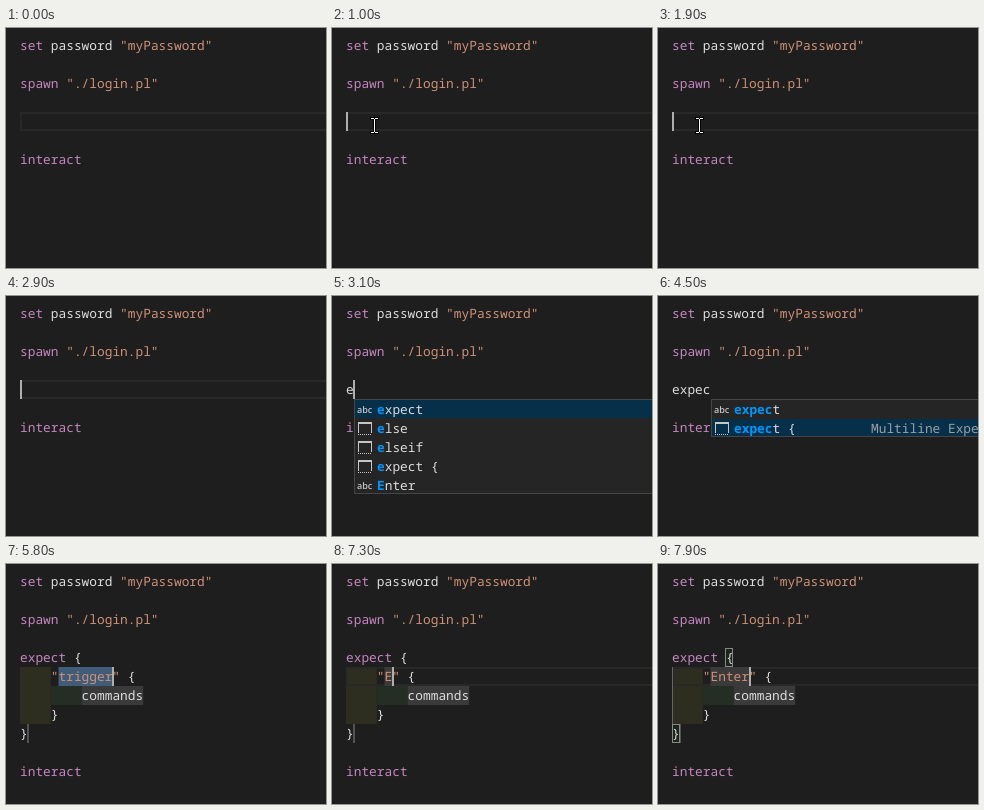
An HTML page with a canvas for the animation above (8000 ms loop, 320 by 240 pixels).

```html
<!DOCTYPE html>
<html lang="en">
<head>
<meta charset="utf-8">
<title>Editor snippet</title>
<style>
html, body { margin: 0; width: 100%; height: 100%; overflow: hidden; background: #1e1e1e; }
canvas { display: block; }
</style>
</head>
<body>
<canvas id="stage" width="320" height="240"></canvas>
<script>
const ctx = document.getElementById('stage').getContext('2d');
const LOOP = 8000, LEFT = 14, TOP = 8, CHAR = 7.7, LINE = 19;
const MONO = '"Noto Sans Mono", "DejaVu Sans Mono", monospace';
const KEYWORD = '#c586c0', STRING = '#ce9178', PLAIN = '#dcdcdc', MATCH = '#0097fb';

const colX = col => LEFT + col * CHAR;
const rowY = row => TOP + row * LINE;

// Latest entry of a [time, ...values] list that has started.
const at = (list, t) => list.filter(entry => entry[0] <= t).pop();

function rect(x, y, w, h, color) {
  ctx.fillStyle = color;
  ctx.fillRect(x, y, w, h);
}

function text(str, x, y, color, font = '12.833px ' + MONO) {
  ctx.font = font;
  ctx.fillStyle = color;
  ctx.fillText(str, x, y);
}

// Writes [string, color] pieces one after the other.
function code(row, col, ...pieces) {
  for (const [str, color] of pieces) {
    text(str, colX(col), rowY(row) + 14, color);
    col += str.length;
  }
}

function frame(x, y, w, h, color, weight = 1) {
  ctx.strokeStyle = color;
  ctx.lineWidth = weight;
  ctx.strokeRect(x + weight / 2, y + weight / 2, w - weight, h - weight);
}

const lineHighlight = row => frame(LEFT, rowY(row), 340, LINE, '#282828', 2);

function caret(row, col) {
  rect(Math.floor(colX(col)), rowY(row), 2, LINE, '#aeafad');
}

// The blink restarts with every key press.
const blinkOn = (t, start) => Math.floor((t - start) / 500) % 2 === 0;

const pointerPath = [
  [0], [300, 55, 47], [400, 52, 62], [500, 47, 84], [600, 43, 94], [700, 42, 96],
  [1000, 42, 97], [1200, 41, 97], [2200, 58, 100], [2300, 130, 92], [2400, 243, 72], [2500]
];

function pointer(t) {
  const [, x, y] = at(pointerPath, t);
  if (x === undefined) return;
  const bars = [[-3, -7, 3, 1], [1, -7, 3, 1], [0, -6, 1, 13], [-3, 7, 3, 1], [1, 7, 3, 1]];
  for (const [dx, dy, w, h] of bars) rect(x + dx - 1, y + dy - 1, w + 2, h + 2, '#000');
  for (const [dx, dy, w, h] of bars) rect(x + dx, y + dy, w, h, '#fff');
}

function snippetIcon(x, y) {
  const color = '#c5c5c5';
  rect(x, y, 1, 11, color);
  rect(x + 13, y, 1, 11, color);
  rect(x, y, 14, 2, color);
  for (let i = 0; i < 14; i += 2) rect(x + i, y + 12, 1, 1, color);
}

function suggestions(typed, selected) {
  const items = typed.length > 1
    ? ['expect', 'expect {']
    : ['expect', 'else', 'elseif', 'expect {', 'Enter'];
  const x = Math.round(colX(typed.length)), y = 103;
  const height = items.length * LINE;
  rect(x, y, 430, height, '#252526');
  items.forEach((item, i) => {
    const top = y + 1 + i * LINE, base = top + 14, n = typed.length;
    if (i === selected) rect(x + 1, top, 428, LINE - 1, '#062f4a');
    if (item === 'expect' || item === 'Enter') {
      text('abc', x + 3, top + 13, '#c5c5c5', '600 9px "Open Sans", sans-serif');
    } else {
      snippetIcon(x + 4, top + 3);
    }
    text(item.slice(0, n), x + 23, base, MATCH, 'bold 12.833px ' + MONO);
    text(item.slice(n), x + 23 + n * CHAR, base, PLAIN);
    if (i === selected && item === 'expect {') text('Multiline Expect', 213, base, '#9a9fa4');
  });
  frame(x, y, 430, height, '#454545');
}

const typing = [[3100, 'e'], [3300, 'ex'], [3500, 'exp'], [3700, 'expe'], [3800, 'expec']];
const naming = [[4800, 'trigger'], [7300, 'E'], [7400, 'En'], [7700, 'Ent'], [7800, 'Ente'], [7900, 'Enter']];

function emptyLine(t) {
  lineHighlight(4);
  code(6, 0, ['interact', KEYWORD]);
  const blinks = [[0, false], [1000, true], [1400, false], [1900, true], [2400, false], [2900, true]];
  if (at(blinks, t)[1]) caret(4, 0);
  pointer(t);
}

function completing(t) {
  const [since, typed] = at(typing, t);
  code(4, 0, [typed, PLAIN]);
  code(6, 0, ['interact', KEYWORD]);
  suggestions(typed, t < 4500 ? 0 : 1);
  if (blinkOn(t, since)) caret(4, typed.length);
}

function bracketBox(row, col) {
  const x = Math.floor(colX(col));
  rect(x, rowY(row), 8, LINE, '#1b251b');
  frame(x, rowY(row), 8, LINE, '#888');
}

function snippet(t) {
  const [since, name] = at(naming, t);
  const indent = 4 * CHAR, selected = name === 'trigger';
  rect(LEFT, rowY(5), indent, 3 * LINE, '#2e2e20');
  rect(colX(4), rowY(6), indent, LINE, '#252e25');
  if (!selected) lineHighlight(5);
  rect(colX(5), rowY(5), name.length * CHAR, LINE, selected ? '#405c79' : '#3a3a3a');
  rect(colX(8), rowY(6), 8 * CHAR, LINE, '#3a3a3a');
  rect(21, rowY(8), 2, LINE, '#525252');
  if (t >= 7500) {
    bracketBox(4, 7);
    bracketBox(8, 0);
    rect(LEFT, rowY(5), 1, 3 * LINE, '#666');
  }
  code(4, 0, ['expect', KEYWORD], [' {', PLAIN]);
  code(5, 4, [`"${name}"`, STRING], [' {', PLAIN]);
  code(6, 8, ['commands', PLAIN]);
  code(7, 4, ['}', PLAIN]);
  code(8, 0, ['}', PLAIN]);
  code(10, 0, ['interact', KEYWORD]);
  if (blinkOn(t, since)) caret(5, 5 + name.length);
}

function draw(now) {
  const t = now % LOOP;
  ctx.textRendering = 'geometricPrecision';
  rect(0, 0, 320, 240, '#1e1e1e');
  code(0, 0, ['set', KEYWORD], [' password ', PLAIN], ['"myPassword"', STRING]);
  code(2, 0, ['spawn', KEYWORD], [' "./login.pl"', STRING]);
  if (t < 3100) emptyLine(t);
  else if (t < 4800) completing(t);
  else snippet(t);
}

const start = performance.now();
function tick() {
  draw(performance.now() - start);
  requestAnimationFrame(tick);
}
tick();
</script>
</body>
</html>
```
